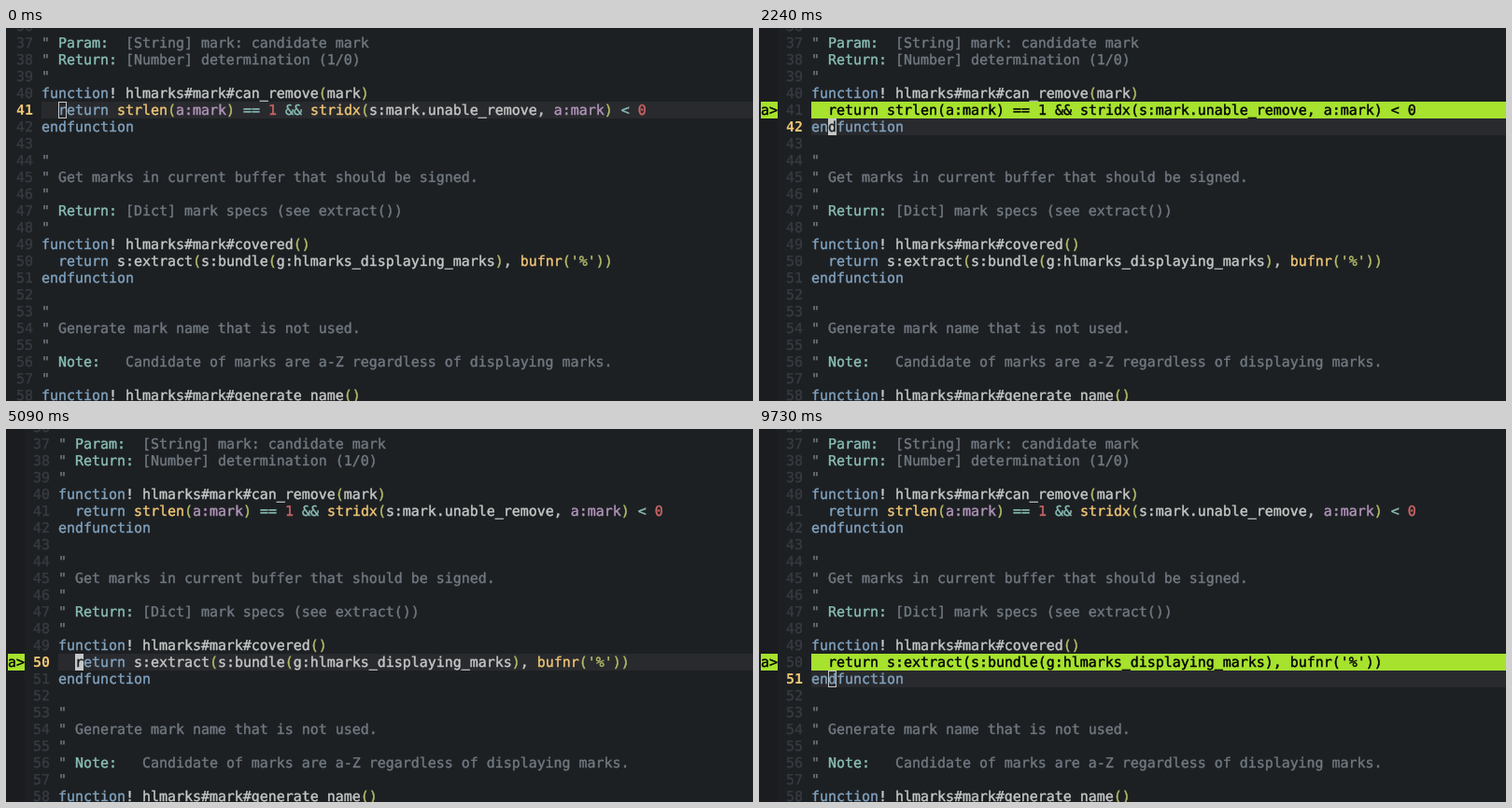
Animation of 800x400 px, one loop 9.83 s. Source, as an HTML page:

```html
<!DOCTYPE html>
<html lang="en">
<head>
<meta charset="utf-8">
<title>Line marks in an editor</title>
<style>
  html, body { margin: 0; width: 100%; height: 100%; overflow: hidden; background: #1d2023; }
  #editor {
    --shift: 0px;
    position: relative; width: 800px; height: 400px; overflow: hidden;
    background: #1d2023; color: #c5c8c6;
    font: 14.95px/18px "DejaVu Sans Mono", monospace;
    font-variant-ligatures: none; white-space: pre;
    text-rendering: geometricPrecision;
    -webkit-text-stroke: 0.4px currentColor;
  }
  #editor.signed { --shift: 18px; }
  #gutter { position: absolute; left: 0; top: 0; width: 20px; height: 400px; background: #1a1c1f; }
  #editor:not(.signed) #gutter { display: none; }

  .row { position: absolute; left: 0; width: 800px; height: 18px; }
  .row > * { position: absolute; top: 0; height: 18px; }
  .num { left: calc(11px + var(--shift)); color: #373b41; }
  .code { left: calc(38px + var(--shift)); right: 0; }
  .sign { left: 2px; width: 18px; background: #a6e22e; color: #000; display: none; }

  .comment { color: #707880; }
  .title, .operator { color: #8abeb7; }
  .keyword { color: #81a2be; }
  .builtin { color: #f0c674; }
  .string, .paren { color: #b5bd68; }
  .argument { color: #b294bb; }
  .number { color: #cc6666; }

  .current .num { color: #f0c674; font-weight: bold; -webkit-text-stroke: 0; }
  .current .code { background: #292a2e; }
  .marked .sign { display: block; }
  .marked:not(.current) .code { background: #a6e22e; }
  .marked:not(.current) .code, .marked:not(.current) .code * { color: #000; }

  #cursor { position: absolute; width: 9px; height: 18px; box-sizing: border-box; }
  #cursor.block { background: #c5c8c6; color: #1d1f21; }
  #cursor.box { border: 1px solid #c5c8c6; }
  #cursor.off { display: none; }
</style>
</head>
<body>
<div id="editor"><div id="gutter"></div></div>
<script>
const LOOP = 9830, FIRST = 36, ROW = 18, CHAR = 9, TOP = -11;

const lines = `"
" Param:  [String] mark: candidate mark
" Return: [Number] determination (1/0)
"
function! hlmarks#mark#can_remove(mark)
  return strlen(a:mark) == 1 && stridx(s:mark.unable_remove, a:mark) < 0
endfunction

"
" Get marks in current buffer that should be signed.
"
" Return: [Dict] mark specs (see extract())
"
function! hlmarks#mark#covered()
  return s:extract(s:bundle(g:hlmarks_displaying_marks), bufnr('%'))
endfunction

"
" Generate mark name that is not used.
"
" Note:   Candidate of marks are a-Z regardless of displaying marks.
"
function! hlmarks#mark#generate_name()`.split('\n');

const codeRule = new RegExp([
  "(?<string>'[^']*')",
  '(?<keyword>\\b(?:endfunction|function|return)\\b)',
  '(?<builtin>\\b(?:strlen|stridx|bufnr)\\b)',
  '(?<argument>\\ba:\\w+)',
  '(?<operator>==|&&|<)',
  '(?<number>\\b\\d+\\b)',
  '(?<paren>[()])'
].join('|'), 'g');
const commentRule = /(?<title>\b(?:Param|Return|Note):)/g;

// [time, line, cursor look, marked line]
const steps = [
  [0, 41, 'box', 0], [150, 41, 'block', 0], [750, 41, 'off', 0],
  [1050, 41, 'block', 41], [1650, 41, 'off', 41], [1940, 41, 'block', 41],
  [2240, 42, 'block', 41], [2390, 43, 'block', 41], [2540, 44, 'block', 41],
  [2690, 45, 'block', 41], [2840, 46, 'block', 41], [3140, 47, 'block', 41],
  [3290, 48, 'block', 41], [3440, 49, 'block', 41], [3740, 50, 'block', 41],
  [4340, 50, 'off', 41], [4640, 50, 'block', 41], [4790, 50, 'off', 41],
  [5090, 50, 'block', 50], [5690, 50, 'off', 50], [5840, 51, 'block', 50],
  [6590, 51, 'off', 50], [6740, 51, 'block', 50], [7190, 51, 'off', 50],
  [7490, 51, 'block', 50], [7790, 51, 'off', 50], [8090, 51, 'block', 50],
  [9730, 51, 'box', 50]
];

const editor = document.getElementById('editor');

function add(parent, className, text = '') {
  const el = document.createElement('span');
  el.className = className;
  el.textContent = text;
  return parent.appendChild(el);
}

function highlight(parent, text) {
  const isComment = text.startsWith('"');
  if (isComment) parent.classList.add('comment');
  let end = 0;
  for (const match of text.matchAll(isComment ? commentRule : codeRule)) {
    parent.append(text.slice(end, match.index));
    const kind = Object.keys(match.groups).find(key => match.groups[key]);
    add(parent, kind, match[0]);
    end = match.index + match[0].length;
  }
  parent.append(text.slice(end));
}

const rows = lines.map((text, i) => {
  const row = add(editor, 'row');
  row.style.top = TOP + i * ROW + 'px';
  add(row, 'sign', 'a>');
  add(row, 'num', FIRST + i);
  highlight(add(row, 'code'), text);
  return row;
});

const cursor = add(editor, '');
cursor.id = 'cursor';

let shown;
function render(now) {
  const time = now % LOOP;
  const step = steps.findLast(([start]) => start <= time);
  if (step === shown) return;
  shown = step;
  const [, line, look, marked] = step;
  const index = line - FIRST;
  const column = Math.min(2, Math.max(0, lines[index].length - 1));
  editor.classList.toggle('signed', marked > 0);
  rows.forEach((row, i) => {
    row.classList.toggle('current', i === index);
    row.classList.toggle('marked', i + FIRST === marked);
  });
  cursor.className = look;
  cursor.textContent = look === 'block' ? lines[index].charAt(column) : '';
  cursor.style.left = `calc(${38 + column * CHAR}px + var(--shift))`;
  cursor.style.top = TOP + index * ROW + 'px';
}

const start = performance.now();
function tick() {
  render(performance.now() - start);
  requestAnimationFrame(tick);
}
tick();
</script>
</body>
</html>
```
